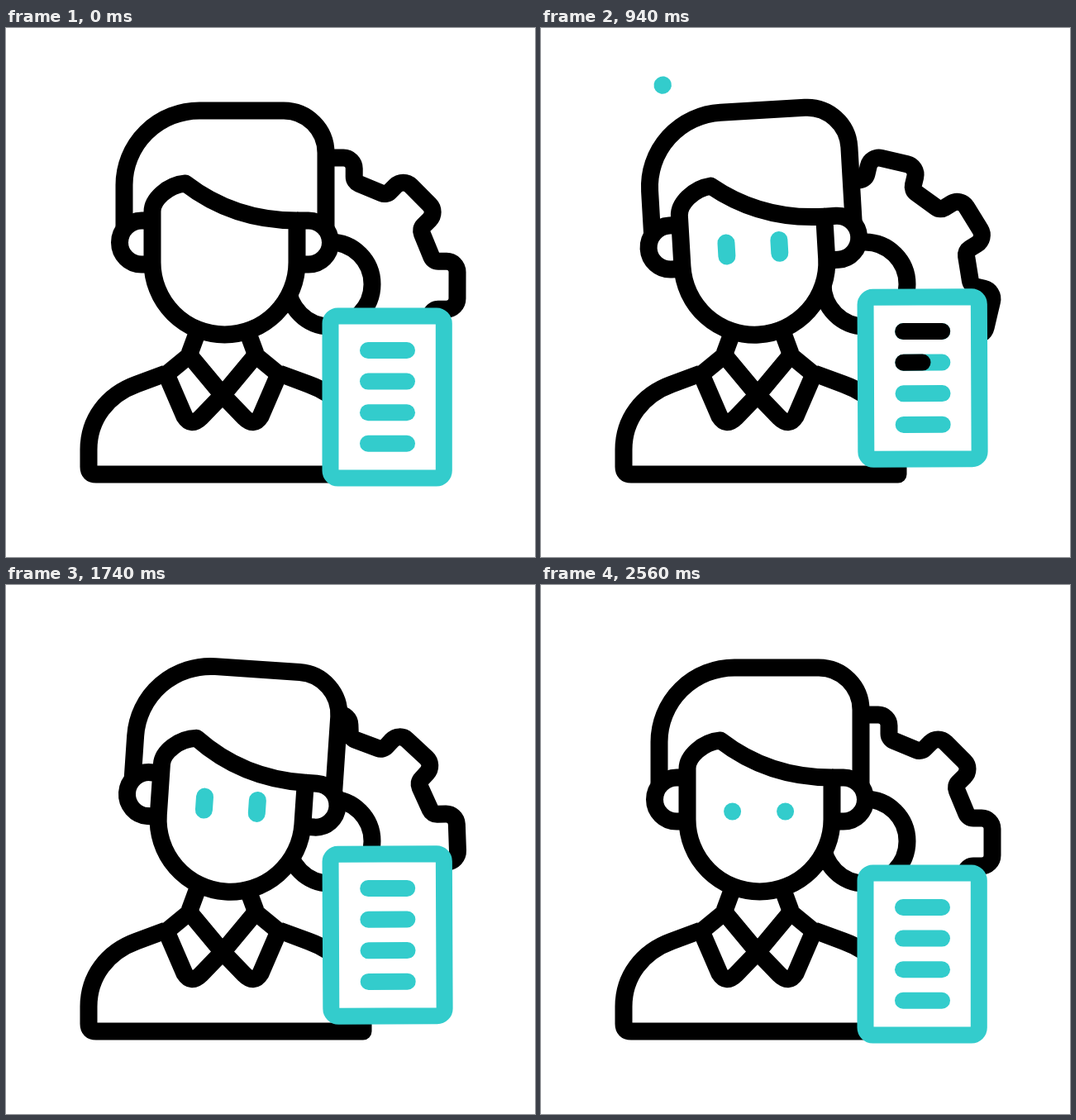
Write an HTML page with a canvas that moves like this. It is 640 px wide and 640 px high and loops after 2.66 s.

```html
<!DOCTYPE html>
<html>
<head>
<meta charset="utf-8">
<style>
  html, body { margin: 0; width: 100%; height: 100%; overflow: hidden; background: #fff; }
  canvas { display: block; }
</style>
</head>
<body>
<canvas id="stage" width="640" height="640"></canvas>
<script>
const ctx = document.getElementById('stage').getContext('2d');
const LOOP = 2660, MOVING = 2560, BLACK = '#000', TEAL = '#33cccc', RAD = Math.PI / 180;

const ramp = (t, start, end) => Math.min(1, Math.max(0, (t - start) / (end - start)));
const ease = (t, start, end) => {
  const u = ramp(t, start, end);
  return u * u * (3 - 2 * u);
};

// The motion of each part as a function of time.
const headAngle = t => -3.35 * ease(t, 0, 520) + 8.65 * ease(t, 930, 1330) - 5.3 * ease(t, 1520, 2160);
const paperLift = t => -23 * (ease(t, 0, 650) - ease(t, 2200, 2540));
const eyeLength = t => 16 * (ease(t, 640, 820) - ease(t, 2200, 2360)) + 5 * Math.sin(Math.PI * ramp(t, 960, 1400));
const gearAngle = t => {
  const u = ramp(t, 0, MOVING);
  return 315 * (u - 0.04 * Math.sin(2 * Math.PI * u) - 0.012 * Math.sin(Math.PI * u) ** 2);
};
const paperAngle = t => {
  const swing = 2.9 * Math.cos(2 * Math.PI * (t - 730) / 800);
  if (t < 730) return 2.9 * ease(t, 330, 730);
  return t < 2330 ? swing : 2.9 * (1 - ease(t, 2330, 2550));
};

const body = new Path2D('M193 418 L158 431 C122 444 100 474 100 510 V531 Q100 540 109 540 H432 V510 C432 474 402 444 366 431 L331 418');
const neck = new Path2D('M236 356 L222 394 L262 444 L302 394 L288 356');
const neckSides = new Path2D('M236 356 L222 394 M288 356 L302 394');
const collar = new Path2D('M222 396 L262 444 L236 471 Q224 483 216 470 L194 419 Z M302 396 L262 444 L288 471 Q300 483 308 470 L330 419 Z');
const hair = new Path2D('M143 240 V190 A91 90 0 0 1 234 100 H336 A51 51 0 0 1 387 151 V242');
const ears = new Path2D('M177 233 H164 A26.5 26.5 0 0 0 164 286 H177 M352 233 H366 A26.5 26.5 0 0 1 366 286 H352');
const face = new Path2D('M177 222 V283.5 A87.5 87.5 0 0 0 352 283.5 V233 C295 233 252 215 217 188 C195 190 177 208 177 222 Z');

// Eight teeth, each drawn from the middle of one tooth to the middle of the next.
const gear = new Path2D();
gear.moveTo(0, -154);
for (let i = 0; i < 8; i++) {
  const corner = (x, y, turn) => {
    const c = Math.cos(turn * 45 * RAD), s = Math.sin(turn * 45 * RAD);
    return [x * c - y * s, x * s + y * c];
  };
  const points = [
    corner(29, -154, i), corner(29, -125, i),
    corner(-29, -125, i + 1), corner(-29, -154, i + 1), corner(0, -154, i + 1)
  ];
  for (let j = 0; j < 4; j++) gear.arcTo(...points[j], ...points[j + 1], j % 3 ? 9 : 13);
}
gear.closePath();

function shape(path, color = BLACK) {
  ctx.strokeStyle = color;
  ctx.fill(path);
  ctx.stroke(path);
}

function line(x0, y0, x1, y1, color) {
  ctx.strokeStyle = color;
  ctx.beginPath();
  ctx.moveTo(x0, y0);
  ctx.lineTo(x1, y1);
  ctx.stroke();
}

function pivot(x, y, degrees) {
  ctx.translate(x, y);
  ctx.rotate(degrees * RAD);
  ctx.translate(-x, -y);
}

function drawGear(t) {
  ctx.translate(392, 311);
  ctx.beginPath();
  ctx.arc(0, -1, 51, 0, 2 * Math.PI);
  ctx.stroke();
  ctx.rotate(gearAngle(t) * RAD);
  ctx.stroke(gear);
}

function drawBody() {
  shape(body);
  ctx.fill(neck);
  ctx.stroke(neckSides);
  shape(collar);
}

function drawHead(t) {
  pivot(264, 390, headAngle(t));
  shape(hair);
  shape(ears);
  shape(face);
  const length = eyeLength(t);
  if (length <= 0) return;
  ctx.lineCap = 'round';
  for (const x of [231.6, 295.6]) line(x, 274, x, 274 - length, TEAL);
}

function drawPaper(t) {
  ctx.translate(0, paperLift(t));
  pivot(461.5, 345, paperAngle(t));
  ctx.lineWidth = 20;
  ctx.lineCap = 'round';
  const sheet = new Path2D();
  sheet.roundRect(392.5, 348.5, 137.3, 196, 9);
  shape(sheet, TEAL);
  for (let i = 0; i < 4; i++) {
    const y = 390 + 37.6 * i, x = u => 438 + 47 * u;
    const tip = ramp(t, 750 + 128 * i, 878 + 128 * i);
    const tail = ramp(t, 1240 + 83 * i, 1323 + 83 * i);
    line(x(0), y, x(1), y, TEAL);
    if (tip > tail) line(x(tail), y, x(tip), y, BLACK);
  }
}

// An arc that grows from one end, then vanishes towards the other.
function sweep(t, x, y, radius, from, to, start, full, gone) {
  if (t <= start || t >= gone) return;
  const at = u => (from + (to - from) * u) * RAD;
  ctx.beginPath();
  ctx.arc(x, y, radius, at(ease(t, full, gone)), at(ease(t, start, full)), to < from);
  ctx.stroke();
}

function drawArcs(t) {
  ctx.lineCap = 'round';
  ctx.strokeStyle = TEAL;
  sweep(t, 254, 216.5, 182, -62, -126, 277, 657, 950);
  sweep(t, 451, 179, 135, -105, -4, 1120, 1500, 1680);
  sweep(t, 545, 450, 60, -50, 50, 2190, 2380, 2540);
}

function frame(now) {
  const t = now % LOOP;
  ctx.fillStyle = '#fff';
  ctx.fillRect(0, 0, 640, 640);
  ctx.lineWidth = 21;
  ctx.lineJoin = 'round';
  for (const draw of [drawGear, drawBody, drawHead, drawPaper, drawArcs]) {
    ctx.save();
    draw(t);
    ctx.restore();
  }
  requestAnimationFrame(frame);
}
requestAnimationFrame(frame);
</script>
</body>
</html>
```
